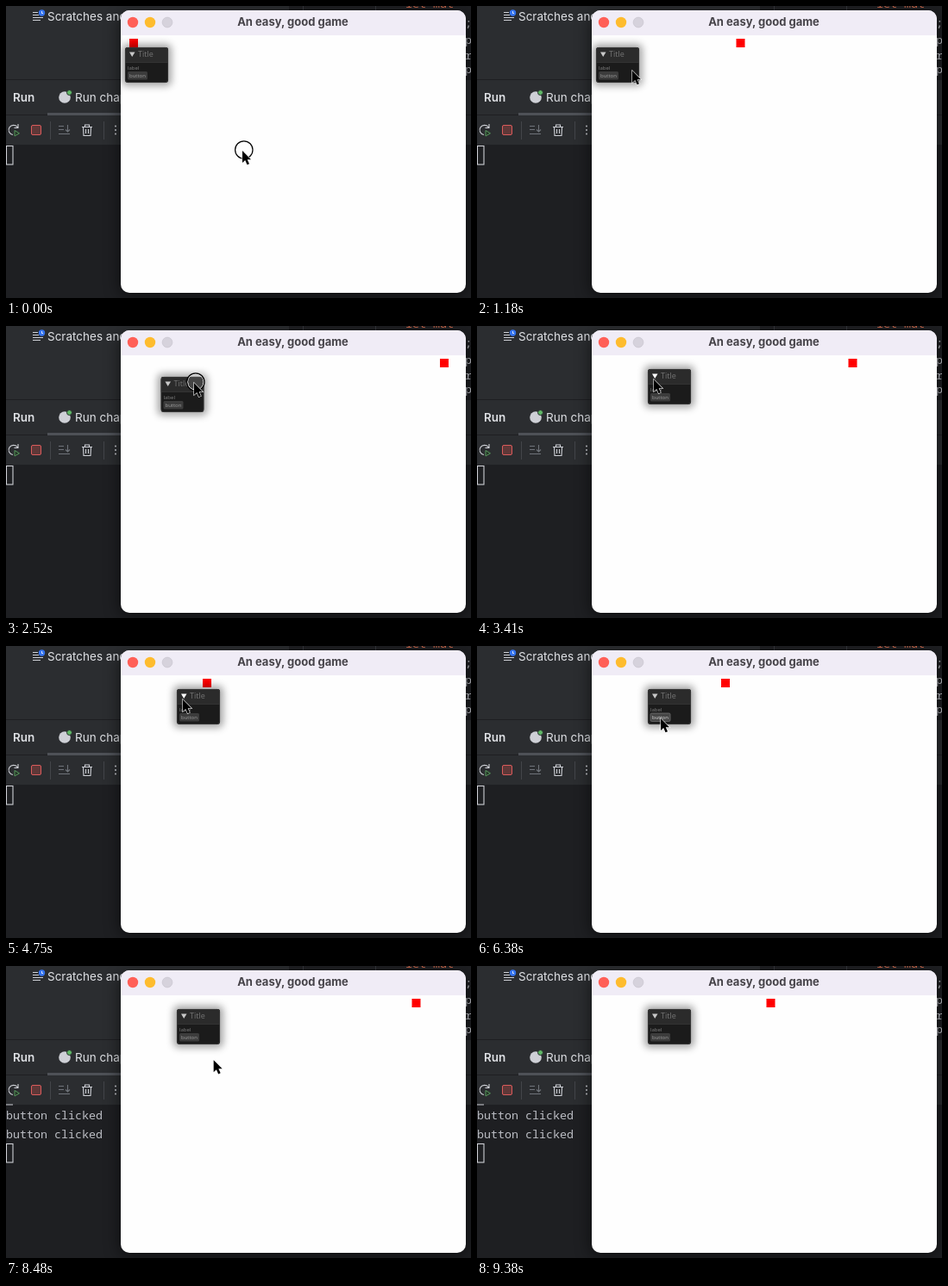
Recreate the animation shown at these times as an HTML page. Size 539 by 339 pixels, loop 9400 ms.

```html
<!DOCTYPE html>
<html lang="en">
<head>
<meta charset="utf-8">
<title>An easy, good game</title>
<style>
  html, body { margin: 0; width: 100%; height: 100%; overflow: hidden; background: #1e1f22; }
  svg { display: block; width: 539px; height: 339px; }
  text { font-family: Inter, sans-serif; font-size: 13.5px; fill: #dfe1e5; white-space: pre; }
  .mono { font-family: "Noto Sans Mono", monospace; font-size: 13.33px; fill: #bcbec4; }
  .gui text { font-family: "Open Sans", sans-serif; font-size: 6px; fill: #808080; }
  .line { fill: none; stroke: #ced0d6; stroke-width: 1.1; }
  .dim { stroke: #6f737a; }
</style>
</head>
<body>
<svg viewBox="0 0 539 339">
  <defs>
    <filter id="winBlur" x="-20%" y="-20%" width="140%" height="140%"><feGaussianBlur stdDeviation="9"/></filter>
    <filter id="guiBlur" x="-50%" y="-80%" width="200%" height="260%"><feGaussianBlur stdDeviation="4.5"/></filter>
    <clipPath id="content"><path d="M133 34H533V323a10 10 0 0 1-10 10H143a10 10 0 0 1-10-10Z"/></clipPath>
    <clipPath id="bodyClip"><rect id="bodyBox" width="50" height="41" rx="3"/></clipPath>
  </defs>

  <!-- editor behind the game -->
  <rect width="539" height="339" fill="#1e1f22"/>
  <path d="M0 0H328V85H0ZM0 86H539V126H0ZM0 127H539V161H0Z" fill="#2b2d30"/>
  <path d="M344.500 0V5M428.500 0V5" stroke="#35373b"/>
  <text class="mono" x="463" y="2" style="fill:#cf6a4c">let mut</text>
  <g>
    <text class="mono" x="532" y="24">;</text>
    <text class="mono" x="532" y="44">p</text>
    <text class="mono" x="532" y="62">r</text>
    <text class="mono" x="532" y="78">p</text>
  </g>
  <path class="line" d="M31 7.500H37M31 10.500H38M31 13.500H43M31 16.500H40"/>
  <circle cx="41.500" cy="8" r="3.700" fill="#3574f0"/>
  <path d="M41.500 6V8.500H43" fill="none" stroke="#fff" stroke-width=".8"/>
  <text x="48" y="17">Scratches and Consoles</text>

  <text x="8" y="111" font-weight="600">Run</text>
  <circle cx="68" cy="106" r="6.800" fill="#ced0d6"/>
  <circle cx="73.500" cy="100.500" r="3" fill="#5fb865" stroke="#2b2d30"/>
  <text x="80" y="111">Run chapter</text>
  <rect x="48" y="124" width="100" height="3" fill="#4e5157"/>

  <path class="line" d="M13.500 141A5.600 5.600 0 1 0 8 149.500M14 137V141.500H9.500"/>
  <path d="M10 144.500L15.500 147.800L10 151Z" fill="#253627" stroke="#57965c"/>
  <rect x="29.500" y="138.500" width="11" height="11" rx="1.500" fill="#5e3838" stroke="#db5c5c"/>
  <path d="M51.500 134V155M113.500 134V155" stroke="#43454a"/>
  <path class="line dim" d="M61 139.500H67M61 143.500H67M61 148.500H74M71.500 138V146M69 143.500L71.500 146L74 143.500"/>
  <path class="line" d="M88 140.500H100M91.500 140V138H96.500V140M89.500 141L90 150.500H98L98.500 141M92.500 143V148M95.500 143V148"/>
  <g fill="#ced0d6"><circle cx="127" cy="139.500" r="1"/><circle cx="127" cy="144" r="1"/><circle cx="127" cy="148.500" r="1"/></g>

  <!-- console -->
  <rect id="scrolled" y="160.500" width="8" height="1" fill="#ced0d6"/>
  <text class="mono" id="log1" x="0" y="178">button clicked</text>
  <text class="mono" id="log2" x="0" y="200">button clicked</text>
  <rect class="line" id="caret" x=".5" y="162.500" width="7.500" height="21.500"/>

  <!-- game window -->
  <rect x="131" y="9" width="404" height="328" rx="12" opacity=".5" filter="url(#winBlur)"/>
  <rect x="133" y="5" width="400" height="328" rx="10" fill="#fefefe"/>
  <path d="M133 34V15a10 10 0 0 1 10-10H523a10 10 0 0 1 10 10V34Z" fill="#f0ecf6"/>
  <circle cx="147" cy="19" r="6.200" fill="#ff5f57"/>
  <circle cx="167" cy="19" r="6.200" fill="#febc2e"/>
  <circle cx="187" cy="19" r="5.900" fill="#d6d2dc" stroke="#c5c1cb" stroke-width=".6"/>
  <text x="332.500" y="23.300" text-anchor="middle" style="font-size:13px;font-weight:700;fill:#464349">An easy, good game</text>

  <g clip-path="url(#content)">
    <rect id="square" y="38" width="10" height="10" fill="#f00"/>
    <g class="gui" id="panel">
      <rect id="shade" x="-4" y="-4" width="58" height="49" rx="6" opacity=".34" filter="url(#guiBlur)"/>
      <g clip-path="url(#bodyClip)">
        <rect width="50" height="41" fill="#1b1b1b"/>
        <rect width="50" height="17" fill="#2b2b2b"/>
        <path d="M0 17.500H50" stroke="#3a3a3a" stroke-width=".8"/>
        <text x="3" y="25.500">label</text>
        <rect id="button" x="3" y="28" width="23" height="9.500" rx="1.500" fill="#3c3c3c"/>
        <text id="buttonText" x="5" y="35">button</text>
      </g>
      <path id="arrow" d="M5 5.500H11.500L8.200 11Z"/>
      <text x="15" y="11" style="font-size:9px;fill:#757575">Title</text>
      <rect id="edge" x=".4" y=".4" width="49.200" height="40.200" rx="3" fill="none" stroke="#3c3c3c" stroke-width=".8"/>
    </g>
  </g>

  <g id="cursor">
    <g id="ring">
      <circle cx="1.800" cy="-1" r="9.300" fill="#fff" fill-opacity=".12" stroke="#fff"/>
      <circle cx="1.800" cy="-1" r="10.200" fill="none" stroke="#000" stroke-width="1.200"/>
    </g>
    <path d="M0 0V14L3.200 11L5.500 16.300L8 15.200L5.700 10.200H10Z" stroke="#fff" stroke-width="1.100" paint-order="stroke"/>
  </g>
</svg>
<script>
const LOOP = 9400, SHORT_STEPS = [3, 6, 12, 20, 28, 35, 38];
const LEFT = 131.75, RIGHT = 534.25, SPEED = 22.5;
// step, x, y
const PATH = [
  [0, 274, 168], [1, 270, 164], [7, 180, 75], [8, 180, 75], [11, 176.5, 55], [12, 176.5, 55],
  [14, 188, 67], [16, 202, 65], [17, 218, 66], [19, 236.5, 57], [20, 236.5, 57], [23, 205, 62],
  [38, 205, 62], [41, 213, 84], [56, 213, 84], [61, 479, 326], [62, 479, 334], [63, 480, 350]
];
const PRESSES = [[0, 0], [12, 19], [30, 31], [35, 35], [44, 45], [50, 53]];
const $ = id => document.getElementById(id);
const set = (id, name, value) => $(id).setAttribute(name, value);
const show = (id, on) => set(id, 'visibility', on ? 'visible' : 'hidden');
const move = (id, [x, y]) => set(id, 'transform', `translate(${x} ${y})`);
const within = (n, [a, b]) => n >= a && n <= b;

function stepAt(t) {
  let n = 0;
  for (let d; n < 63 && t >= (d = SHORT_STEPS.includes(n) ? 140 : 150); n++) t -= d;
  return n;
}

function squareX(n) {
  const span = RIGHT - LEFT;
  const d = Math.abs(143 + SPEED * (n - 1) - LEFT) % (2 * span);
  return LEFT + (d < span ? d : 2 * span - d);
}

function pointer(n) {
  const i = Math.max(1, PATH.findIndex(p => p[0] >= n));
  const [a, ax, ay] = PATH[i - 1], [b, bx, by] = PATH[i];
  let k = (n - a) / (b - a);
  if (b - a > 2) k = k * k * (3 - 2 * k);
  return [ax + (bx - ax) * k, ay + (by - ay) * k];
}

function panelAt(n, [x, y]) {
  return n < 12 ? [138, 48] : n < 20 ? [x - 38.5, y - 7] : [198, 50];
}

function draw(n) {
  const at = pointer(n);
  const pressed = PRESSES.some(p => within(n, p));
  const open = n === 33 || n === 37 ? .5 : within(n, [34, 36]) ? 0 : 1;
  const height = 17 + 24 * open;
  const logs = (n >= 46) + (n >= 55);
  const hover = within(n, [41, 56]);

  set('square', 'x', squareX(n));
  move('panel', panelAt(n, at));
  set('bodyBox', 'height', height);
  set('edge', 'height', height - .8);
  set('shade', 'height', height + 8);
  set('arrow', 'fill', within(n, [22, 39]) ? '#fff' : '#c8c8c8');
  set('arrow', 'transform', `rotate(${-90 * (1 - open)} 8.2 8)`);
  set('button', 'fill', hover ? '#464646' : '#3c3c3c');
  set('button', 'stroke', hover ? '#777' : 'none');
  set('button', 'stroke-width', .7);
  $('buttonText').style.fill = hover ? '#e0e0e0' : '#a0a0a0';

  move('cursor', at);
  show('ring', pressed);
  show('scrolled', logs > 0);
  show('log1', logs > 0);
  show('log2', logs > 1);
  set('caret', 'y', 162.5 + 22 * logs);
}

const start = performance.now();
function tick() {
  draw(stepAt((performance.now() - start) % LOOP));
  requestAnimationFrame(tick);
}
tick();
</script>
</body>
</html>
```
